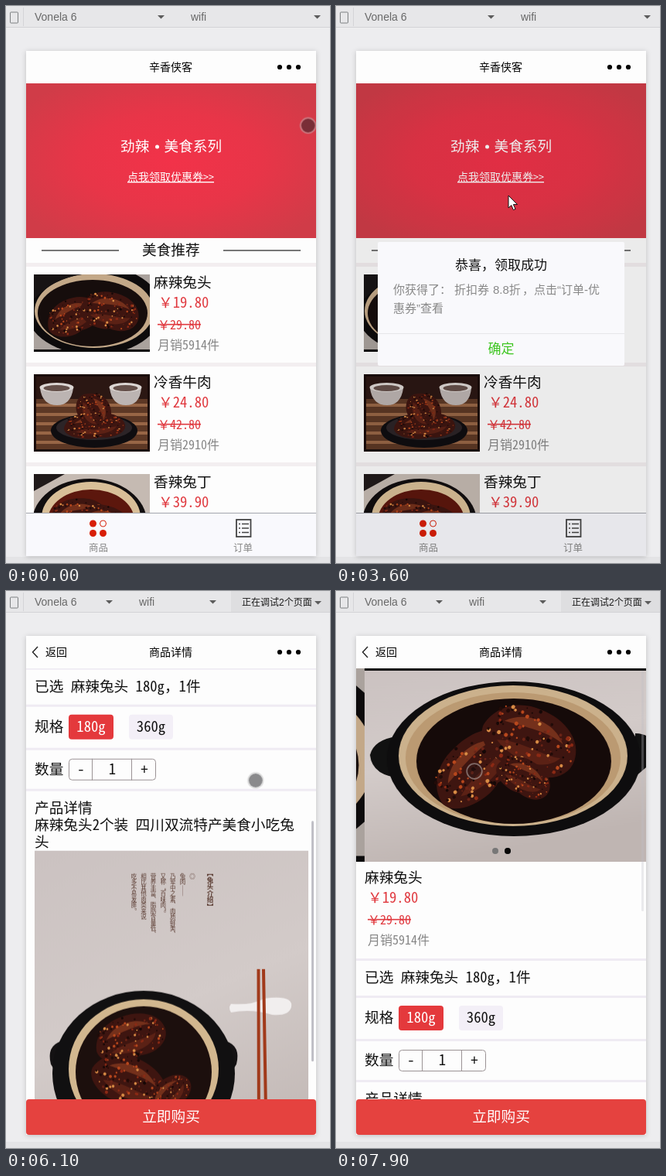
An HTML page for the animation above (8000 ms loop, 419 by 720 pixels).

```html
<!DOCTYPE html>
<html lang="zh-CN">
<head>
<meta charset="utf-8">
<title>点餐演示</title>
<style>
html, body { margin: 0; width: 100%; height: 100%; overflow: hidden; background: #ededef; }
svg { display: block; }
text { font-family: "Noto Sans CJK SC", "Noto Sans CJK", sans-serif; white-space: pre; }
.bar text { font: 14px "Liberation Sans", Arial, sans-serif; fill: #686868; }
.bar .zh { font: 12px "Liberation Sans", "Noto Sans CJK SC", sans-serif; fill: #1c1c1c; }
.nav { font-size: 14px; }
.song text { font: 300 18.67px "Noto Sans Mono CJK SC", "Noto Sans CJK SC", monospace; fill: #111; }
.song .red { fill: #e0383e; }
.song .was { font-size: 16px; fill: #e0383e; text-decoration: line-through; }
.song .sold { font-size: 16px; fill: #858585; }
.song .white { fill: #fff; }
.song .link { font-size: 14px; text-decoration: underline; }
.mid { text-anchor: middle; }
.end { text-anchor: end; }
.tab { font-size: 12.5px; fill: #858585; }
.modal text { font: 15px "Liberation Sans", "Noto Sans CJK SC", sans-serif; fill: #888; }
.modal .big { font-size: 17px; fill: #111; }
.modal .ok { font-size: 17px; fill: #3cc51f; }
.story text { font: 7.5px "Noto Sans CJK SC", sans-serif; fill: #58392f; writing-mode: vertical-rl; }
.story .head { font-size: 8.5px; font-weight: 700; }

.a { animation: 8s linear infinite; }
.h { animation: 8s step-end infinite; }

#shop, #shopBar { animation-name: shop; }
#detail, #detailBar { animation-name: detail; }
@keyframes shop { 0% { visibility: visible } 58.7%, 100% { visibility: hidden } }
@keyframes detail { 0% { visibility: hidden } 58.7%, 100% { visibility: visible } }

#list { animation-name: list; }
@keyframes list {
  0%, 3.75% { transform: none }
  8%, 10.5% { transform: translateY(-195px) }
  13% { transform: translateY(-110px) }
  15.6%, 100% { transform: none }
}
#listThumb { animation-name: listThumb; }
@keyframes listThumb {
  0%, 3.75% { transform: none; opacity: 0 }
  4% { opacity: 1 }
  8%, 10.5% { transform: translateY(146px) }
  13% { transform: translateY(82px) }
  15.6% { transform: none }
  19% { transform: none; opacity: 1 }
  22%, 100% { opacity: 0; transform: none }
}

#mask { animation-name: mask; }
@keyframes mask {
  0%, 24% { opacity: 0 }
  27.5%, 34.8% { opacity: 1 }
  38%, 44.5% { opacity: 0 }
  45% { opacity: .24 }
  47.5%, 51.25% { opacity: 1 }
  54%, 100% { opacity: 0 }
}
#modal { animation-name: modal; }
@keyframes modal {
  0%, 24.2% { opacity: 0 }
  25.5%, 34.8% { opacity: 1 }
  37%, 44.4% { opacity: 0 }
  44.9%, 51.25% { opacity: 1 }
  53%, 100% { opacity: 0 }
}
#gift1 { animation-name: gift1; }
#gift2 { animation-name: gift2; }
@keyframes gift1 { 0% { opacity: 1 } 40%, 100% { opacity: 0 } }
@keyframes gift2 { 0% { opacity: 0 } 40%, 100% { opacity: 1 } }

#load { animation-name: load; }
@keyframes load {
  0%, 58.7% { transform: scaleX(0); opacity: 1 }
  67.5%, 69.8% { transform: none; opacity: 1 }
  69.9%, 100% { transform: none; opacity: 0 }
}
#goods { animation-name: goods; }
@keyframes goods { 0% { opacity: 0 } 69.9%, 100% { opacity: 1 } }
#scroll { animation-name: scroll; }
@keyframes scroll {
  0%, 72.5% { transform: none }
  77.5% { transform: translateY(-500px) }
  79%, 80% { transform: translateY(-540px) }
  82.5% { transform: translateY(-366px) }
  85% { transform: translateY(-210px) }
  90%, 100% { transform: none }
}
#thumb { animation-name: thumb; }
@keyframes thumb {
  0%, 72.4% { transform: none; opacity: 0 }
  72.5% { transform: none; opacity: 1 }
  77.5% { transform: translateY(258px) }
  79%, 80% { transform: translateY(279px) }
  82.5% { transform: translateY(189px) }
  85% { transform: translateY(108px) }
  90% { transform: none; opacity: 1 }
  95%, 100% { transform: none; opacity: .3 }
}
#slides { animation-name: slides; }
@keyframes slides {
  0%, 92.5% { transform: none }
  96.5% { transform: translateX(-170px) }
  97.6% { transform: translateX(-310px) }
  98.75% { transform: translateX(-364px) }
  100% { transform: translateX(-375px) }
}
#dotOn { animation-name: dotOn; }
@keyframes dotOn { 0% { transform: none } 97%, 100% { transform: translateX(16px) } }

#touch { animation-name: touch; }
@keyframes touch {
  0% { transform: translate(391px, 153px) }
  3.2%, 3.75% { transform: translate(298px, 544px) }
  8% { transform: translate(293px, 349px) }
  10.5% { transform: translate(317px, 250px) }
  13% { transform: translate(317px, 335px) }
  16.25% { transform: translate(316px, 402px) }
  18% { transform: translate(312px, 434px) }
  23% { transform: translate(229px, 216px) }
  29% { transform: translate(229px, 215px) }
  33%, 35% { transform: translate(214px, 440px) }
  42%, 45.2% { transform: translate(223px, 245px) }
  49.5%, 51.5% { transform: translate(216px, 441px) }
  56.25% { transform: translate(316px, 378px) }
  58.5%, 69% { transform: translate(322px, 370px) }
  72.5% { transform: translate(322px, 515px) }
  77.5%, 79% { transform: translate(323px, 156px) }
  80% { transform: translate(323px, 254px) }
  82.5% { transform: translate(323px, 426px) }
  84.5% { transform: translate(320px, 515px) }
  86% { transform: translate(320px, 330px) }
  89.5% { transform: translate(313px, 515px) }
  92.5% { transform: translate(340px, 240px) }
  96.5%, 100% { transform: translate(179px, 233px) }
}
#finger { animation-name: finger; }
#arrow { animation-name: arrow; }
@keyframes finger { 0% { opacity: 1 } 24.2% { opacity: 0 } 36% { opacity: 1 } 44.4% { opacity: 0 } 52.5%, 100% { opacity: 1 } }
@keyframes arrow { 0% { opacity: 0 } 24.2% { opacity: 1 } 36% { opacity: 0 } 44.4% { opacity: 1 } 52.5%, 100% { opacity: 0 } }
#press { animation-name: press; }
@keyframes press { 0% { opacity: 1 } 96.8%, 100% { opacity: .35 } }
</style>
</head>
<body>
<svg width="419" height="720" viewBox="0 0 419 720">
<defs>
  <radialGradient id="red" cx=".5" cy=".5" r=".62">
    <stop offset="0" stop-color="#f23249"/><stop offset=".5" stop-color="#e83548"/><stop offset="1" stop-color="#d03c48"/>
  </radialGradient>
  <linearGradient id="linen" x2=".3" y2="1">
    <stop offset="0" stop-color="#cbc2c1"/><stop offset=".5" stop-color="#d3cbc9"/><stop offset="1" stop-color="#bfb5b2"/>
  </linearGradient>
  <filter id="shade" x="-5%" y="-5%" width="110%" height="110%">
    <feDropShadow dx="0" dy="1" stdDeviation="3" flood-opacity=".2"/>
  </filter>
  <clipPath id="listView"><rect x="26" y="100" width="375" height="555"/></clipPath>
  <clipPath id="goodsView"><rect x="26" y="100" width="375" height="603"/></clipPath>
  <clipPath id="swipe"><rect x="26" y="100" width="375" height="250"/></clipPath>
  <clipPath id="frame"><rect width="150" height="100"/></clipPath>
  <clipPath id="wide"><rect width="375" height="250"/></clipPath>
  <clipPath id="tall"><rect x="37" y="712" width="354" height="510"/></clipPath>

  <g id="meat">
    <path d="M-46 8C-44-14-24-27-4-28C22-31 44-20 47-2C50 16 30 29 8 26C-8 34-44 28-46 8Z" fill="#3e1510"/>
    <path d="M-30-4C-16-22 14-24 30-10C14-14-10-8-30-4Z" fill="#74301b"/>
    <path d="M-28 14C-8 4 18 8 34 2C28 20-6 24-28 14Z" fill="#5b2115"/>
  </g>
  <g id="photo0" clip-path="url(#frame)">
    <rect width="150" height="100" fill="#aaa29d"/>
    <ellipse cx="78" cy="46" rx="88" ry="58" fill="#0d0b0c"/>
    <ellipse cx="78" cy="47" rx="77" ry="48" fill="#c3a888"/>
    <ellipse cx="76" cy="50" rx="71" ry="43" fill="#160d0c"/>
    <path d="M0 0H62Q24 6 0 32Z" fill="#171314"/>
    <use href="#meat" transform="translate(50 54) rotate(-18) scale(.75 .8)"/>
    <use href="#meat" transform="translate(98 47) rotate(16) scale(.82 .85)"/>
    <rect y="97" width="150" height="3" fill="#0b0a0b"/>
  </g>
  <g id="photo1" clip-path="url(#frame)">
    <rect width="150" height="100" fill="#5d3825"/>
    <rect width="150" height="32" fill="#2b1713"/>
    <path d="M0 40H150M0 52H150M0 64H150M0 76H150M0 88H150" stroke="#986646" stroke-width="4"/>
    <path d="M8 18H51Q48 40 30 40Q11 40 8 18ZM98 18H139Q137 40 119 40Q101 40 98 18Z" fill="#bcb4b2"/>
    <ellipse cx="29.500" cy="17" rx="22" ry="6" fill="#dcd6d3"/><ellipse cx="118.500" cy="17" rx="21" ry="6" fill="#dcd6d3"/>
    <ellipse cx="29.500" cy="18" rx="17" ry="4" fill="#65504a"/><ellipse cx="118.500" cy="18" rx="16" ry="4" fill="#65504a"/>
    <ellipse cx="78" cy="73" rx="56" ry="22" fill="#0f0d10"/>
    <ellipse cx="78" cy="69" rx="49" ry="16" fill="#2c2427"/>
    <use href="#meat" transform="translate(78 66) scale(.85 .6)"/>
    <use href="#meat" transform="translate(78 47) rotate(74) scale(.52 .75)"/>
    <path d="M0 0H150V100H0Z" fill="none" stroke="#1a0c0a" stroke-width="6"/>
  </g>
  <g id="photo2" clip-path="url(#frame)">
    <rect width="150" height="100" fill="#c5bab2"/>
    <path d="M0 0H40L0 22Z" fill="#201a1a"/>
    <ellipse cx="72" cy="62" rx="74" ry="56" fill="#110e0f"/>
    <ellipse cx="74" cy="56" rx="64" ry="46" fill="#d9bf98"/>
    <ellipse cx="74" cy="60" rx="56" ry="40" fill="#5c170d"/>
    <use href="#meat" transform="translate(58 54) scale(.8)"/>
    <use href="#meat" transform="translate(92 62) rotate(20) scale(.75)"/>
  </g>
  <g id="potWide" clip-path="url(#wide)">
    <rect width="375" height="250" fill="url(#linen)"/>
    <path d="M7 112Q12 92 42 88L50 142Q10 140 7 112ZM350 84Q378 84 376 118L350 140Z" fill="#111"/>
    <ellipse cx="193" cy="117" rx="164" ry="100" fill="#0e0d0e"/>
    <ellipse cx="192" cy="113" rx="148" ry="91" fill="#cbb18c"/>
    <ellipse cx="192" cy="116" rx="139" ry="85" fill="#bb9a72"/>
    <ellipse cx="193" cy="120" rx="126" ry="81" fill="#150a09"/>
    <use href="#meat" transform="translate(143 128) rotate(-38) scale(1.35 1.3)"/>
    <use href="#meat" transform="translate(214 92) rotate(28) scale(1.35 1.45)"/>
    <use href="#meat" transform="translate(206 140) rotate(34) scale(.8 .8)"/>
    <rect width="375" height="3" fill="#0a0a0a"/>
  </g>
</defs>

<rect width="419" height="720" fill="#ededef"/>
<rect y="712" width="419" height="8" fill="#e4e4e6"/>
<g class="bar">
  <rect width="419" height="27" fill="#e7e7e9"/>
  <path d="M0 27.500H419M22.500 2V26" stroke="#d3d3d6"/>
  <rect x="5.500" y="8" width="10" height="14" rx="1" fill="none" stroke="#7d8082"/>
  <text x="37" y="19">Vonela 6</text>
  <g id="shopBar" class="h">
    <path d="M196 12h9l-4.500 4.500zM398 12h9l-4.500 4.500z" fill="#5c5c5c"/>
    <text x="239" y="19">wifi</text>
  </g>
  <g id="detailBar" class="h">
    <rect x="291" width="128" height="27" fill="#dedee0"/>
    <path d="M129 12h9l-4.500 4.500zM263 12h9l-4.500 4.500zM399 13h9l-4.500 4.500z" fill="#5c5c5c"/>
    <text x="172" y="19">wifi</text>
    <text class="zh" x="305" y="19">正在调试2个页面</text>
  </g>
</g>

<g id="shop" class="h">
  <rect x="26" y="58" width="375" height="653" fill="#fdfdfd" filter="url(#shade)"/>
  <text class="nav mid" x="213" y="84">辛香侠客</text>
  <g clip-path="url(#listView)">
    <g id="list" class="a song">
      <rect x="26" y="100" width="375" height="200" fill="url(#red)"/>
      <text class="white" x="148" y="188">劲辣</text>
      <circle cx="195.500" cy="182" r="2.500" fill="#fff"/>
      <text class="white" x="204.500" y="188">美食系列</text>
      <text class="white link" x="157" y="226">点我领取优惠券&gt;&gt;</text>
      <path d="M46 316H146M281 316H381" stroke="#777" stroke-width="2"/>
      <text x="176" y="322">美食推荐</text>
      <g id="items"></g>
    </g>
    <rect id="listThumb" class="a" x="395" y="102" width="3" height="401" rx="1.500" fill="#b4b4b8"/>
  </g>
  <rect x="26" y="655" width="375" height="56" fill="#f9f9fd"/>
  <path d="M26 655.500H401" stroke="#a3a5ac"/>
  <g fill="#d81e06">
    <circle cx="112.500" cy="669" r="4.500"/><circle cx="112.500" cy="681.500" r="4.500"/><circle cx="125.500" cy="681.500" r="4.500"/>
    <circle cx="125.500" cy="669" r="4" fill="none" stroke="#d81e06"/>
  </g>
  <text class="tab mid" x="119.500" y="705">商品</text>
  <rect x="298" y="664" width="18.500" height="22" fill="none" stroke="#444" stroke-width="1.800"/>
  <path d="M301 669.500h2m2 0h9M301 675h2m2 0h9M301 680.500h2m2 0h9" stroke="#444" stroke-width="1.600"/>
  <text class="tab mid" x="306.500" y="705">订单</text>

  <rect id="mask" class="a" x="26" y="100" width="375" height="611" fill="rgba(0,0,0,.29)"/>
  <g id="modal" class="a modal">
    <rect x="54" y="305" width="319" height="160" rx="2" fill="#f9f9fc"/>
    <text class="big mid" x="213.500" y="341">恭喜，领取成功</text>
    <text x="74" y="372">你获得了：</text>
    <g id="gift1" class="h"><text x="153" y="372">代金券</text><text x="205" y="372">¥ 2.9</text></g>
    <g id="gift2" class="h"><text x="153" y="372">折扣券</text><text x="203" y="372">8.8折</text></g>
    <text class="end" x="341" y="372">，点击“订单-优</text>
    <text x="74" y="396">惠券”查看</text>
    <path d="M54 423.500H373" stroke="#e6e6ea"/>
    <text class="ok mid" x="213.500" y="449">确定</text>
  </g>
</g>

<g id="detail" class="h">
  <rect x="26" y="58" width="375" height="645" fill="#fdfdfd" filter="url(#shade)"/>
  <path d="M41 72L34.500 79L41 86" fill="none" stroke="#222" stroke-width="1.400"/>
  <text class="nav" x="51" y="84">返回</text>
  <text class="nav mid" x="213" y="84">商品详情</text>
  <path d="M26 100.500H401" stroke="#dcdae2"/>
  <rect id="load" class="a" x="26" y="100" width="375" height="2" fill="#43b735" style="transform-origin:26px 100px"/>
  <g id="goods" class="h song">
    <g clip-path="url(#goodsView)">
      <g id="scroll" class="a">
        <g clip-path="url(#swipe)">
          <g id="slides" class="a">
            <use href="#photo0" transform="translate(26 100) scale(2.5)"/>
            <use href="#potWide" transform="translate(401 100)"/>
          </g>
          <circle cx="206" cy="336" r="4" fill="#777"/><circle cx="222" cy="336" r="4" fill="#777"/>
          <circle id="dotOn" class="h" cx="206" cy="336" r="4" fill="#080808"/>
        </g>
        <text x="37" y="377">麻辣兔头</text>
        <text class="red" x="41" y="403">￥19.80</text>
        <text class="was" x="41" y="431">￥29.80</text>
        <text class="sold" x="41" y="457">月销5914件</text>
        <path d="M26 476.500H401M26 524.500H401M26 580.500H401M26 633.500H401" stroke="#efebf3" stroke-width="3"/>
        <text x="37" y="506">已选 麻辣兔头 180g，1件</text>
        <text x="37" y="558">规格</text>
        <rect x="81" y="536" width="58" height="32" rx="4" fill="#e4393c"/>
        <text class="white mid" x="110" y="558">180g</text>
        <rect x="159" y="536" width="57" height="32" rx="4" fill="#f3eff7"/>
        <text class="mid" x="187.500" y="558">360g</text>
        <text x="37" y="613">数量</text>
        <path d="M111.500 593V621M162.500 593V621" stroke="#9b9395"/>
        <rect x="81.500" y="593.500" width="112" height="27" rx="4" fill="none" stroke="#9b9395"/>
        <text class="mid" x="97" y="613">-</text><text class="mid" x="137.500" y="613">1</text><text class="mid" x="179" y="613">+</text>
        <text x="37" y="663">产品详情</text>
        <text x="37" y="685">麻辣兔头2个装 四川双流特产美食小吃兔</text>
        <text x="37" y="707">头</text>
        <g clip-path="url(#tall)">
          <rect x="37" y="712" width="354" height="510" fill="url(#linen)"/>
          <g id="story" class="story"></g>
          <path d="M291 910Q318 912 334 903Q372 898 369 914Q366 926 344 924Q318 916 291 921Q287 915 291 910Z" fill="#f1eeee"/>
          <path d="M326.500 865L327 1110M333 865L337 1110" stroke="#a13a1b" stroke-width="4"/>
          <path d="M72 958Q52 964 58 988L72 1010ZM284 958Q304 964 298 988L284 1010Z" fill="#141213"/>
          <ellipse cx="178" cy="1000" rx="118" ry="107" fill="#111011"/>
          <ellipse cx="178" cy="994" rx="97" ry="90" fill="#d2b78f"/>
          <ellipse cx="178" cy="998" rx="88" ry="85" fill="#1c0f0d"/>
          <use href="#meat" transform="translate(160 953) rotate(-14)"/>
          <use href="#meat" transform="translate(160 1010) rotate(30) scale(1.1)"/>
          <use href="#meat" transform="translate(210 1028) rotate(-40) scale(.7)"/>
        </g>
      </g>
      <rect id="thumb" class="a" x="395" y="103" width="3" height="311" rx="1.500" fill="#c0bfc6"/>
    </g>
    <rect x="26" y="657" width="375" height="46" rx="4" fill="#e5423f"/>
    <text class="white mid" x="213.500" y="686">立即购买</text>
  </g>
</g>

<circle cx="354" cy="79" r="3.100"/><circle cx="366" cy="79" r="3.100"/><circle cx="378" cy="79" r="3.100"/>

<g id="touch" class="a">
  <g id="finger" class="h">
    <circle id="press" class="h" r="9" fill="rgba(35,35,40,.53)"/>
    <circle r="9.800" fill="none" stroke="rgba(190,190,190,.5)" stroke-width="1.800"/>
  </g>
  <path id="arrow" class="h" d="M0 0V16L3.800 12.600L6.400 18.600L9 17.400L6.400 11.600H11.500Z" fill="#fff" stroke="#111"/>
</g>
</svg>
<script>
const $ = id => document.getElementById(id);

const goods = [
  ['麻辣兔头', '19.80', '29.80', 5914, 0],
  ['冷香牛肉', '24.80', '42.80', 2910, 1],
  ['香辣兔丁', '39.90', '59.80', 1836, 2],
  ['手撕牛肉', '32.80', '45.80', 1527, 1]
];
$('items').innerHTML = goods.map(([name, price, was, sold, photo], i) => `
  <g transform="translate(0 ${337 + 129 * i})">
    <rect x="26" y="-5" width="375" height="5" fill="#f3eef0"/>
    <use href="#photo${photo}" x="36" y="10"/>
    <text x="191" y="27">${name}</text>
    <text class="red" x="197" y="53">￥${price}</text>
    <text class="was" x="196" y="81">￥${was}</text>
    <text class="sold" x="196" y="107">月销${sold}件</text>
  </g>`).join('');

const lines = ['◎', '兔肉——', '乃荤中之素、肉质鲜美、', '又称“百味肉”。', '营养丰富、脂肪含量低、', '相比其他肉类来说', '吃多不易发胖。'];
$('story').innerHTML = '<text class="head" x="264" y="737">【兔头介绍】</text>' +
  lines.map((s, i) => `<text x="${241 - 12.6 * i}" y="741">${s}</text>`).join('');

// Chilli flakes and sesame, spread over the meat
let seed = 7;
const rnd = () => (seed = seed * 16807 % 2147483647) / 2147483647;
const spice = ['#b8481d', '#8c2a15', '#d98c45', '#210b08', '#6b2417', '#160807'];
let flakes = '';
for (let i = 0; i < 110; i++) {
  const a = rnd() * 6.283, r = Math.sqrt(rnd());
  flakes += `<circle cx="${(46 * r * Math.cos(a)).toFixed(1)}" cy="${(27 * r * Math.sin(a)).toFixed(1)}" r="${(.6 + rnd() * 1.3).toFixed(1)}" fill="${spice[i % spice.length]}"/>`;
}
$('meat').innerHTML += flakes;
</script>
</body>
</html>
```
